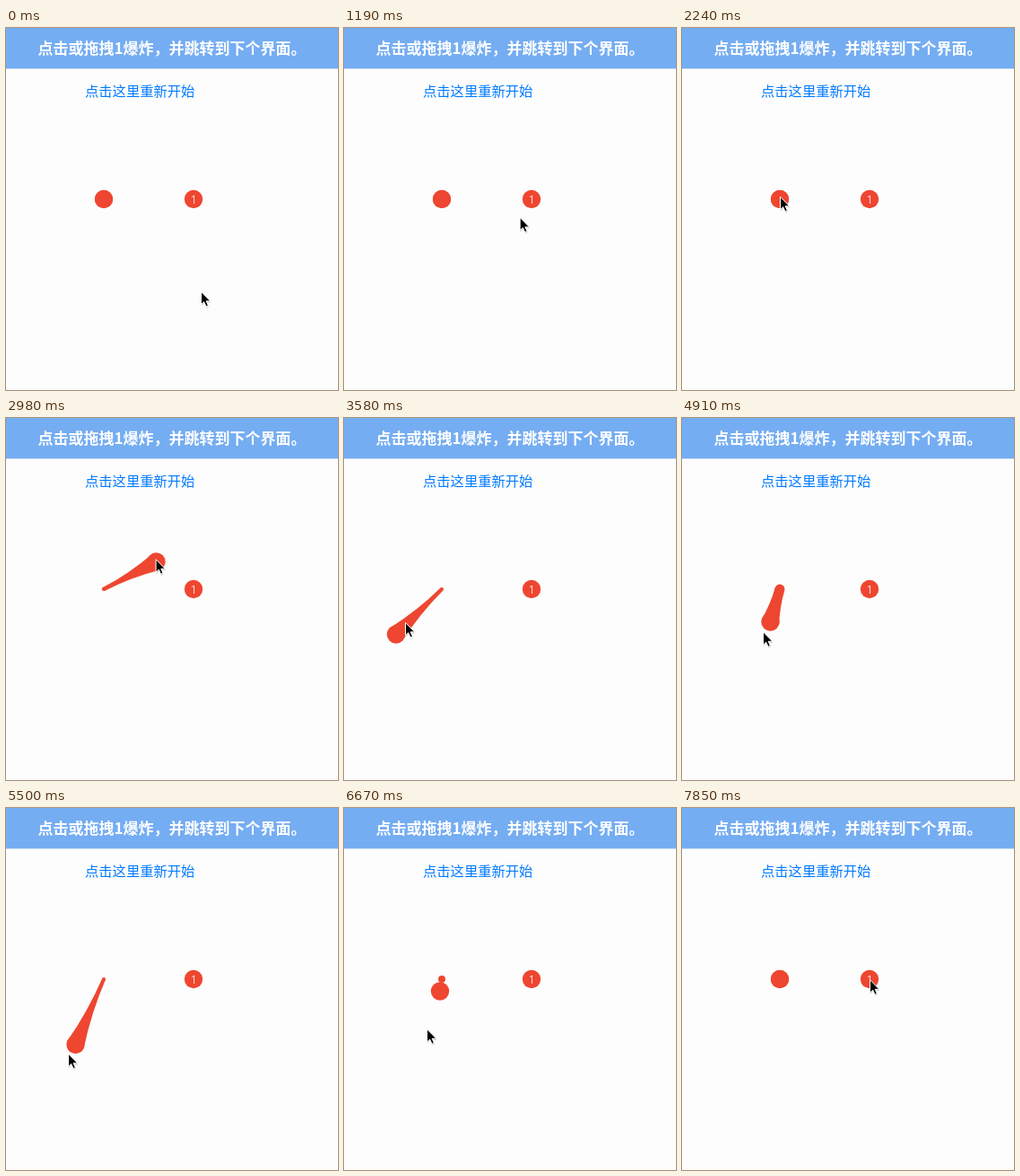
Recreate the animation shown at these times as an HTML page. Size 370 px wide and 404 px high, loop 8 s.

```html
<!DOCTYPE html>
<html lang="zh-CN">
<head>
<meta charset="utf-8">
<style>
  html, body { margin: 0; width: 100%; height: 100%; overflow: hidden; background: #fdfdfd; }
  svg { display: block; width: 370px; height: 404px; }
  text { font-family: "Noto Sans CJK SC", "Noto Sans CJK", "Noto Sans CJK JP", sans-serif; text-anchor: middle; }
  .title { font-size: 17px; font-weight: 700; fill: #fff; }
  .link { font-size: 15.3px; fill: #007aff; }
  .badge { font: 300 12px Inter, "Liberation Sans", sans-serif; fill: #fff; }
  .red { fill: #ee4630; }
</style>
</head>
<body>
<svg viewBox="0 0 370 404">
  <rect width="370" height="404" fill="#fdfdfd"/>
  <rect width="370" height="45.4" fill="#75adf2"/>
  <text class="title" x="185" y="29.3">点击或拖拽1爆炸，并跳转到下个界面。</text>
  <text class="link" x="149.2" y="75.7">点击这里重新开始</text>

  <circle class="red" cx="209" cy="191" r="10.2"/>
  <text class="badge" x="208.8" y="195.5">1</text>

  <path id="neck" class="red"/>
  <circle id="stub" class="red" cx="109" cy="191"/>
  <circle id="ball" class="red" r="10.2"/>

  <g id="cursor">
    <path d="M.6 1.8V16.2L4 13.2L6.4 18.2L9 17L6.8 12.4H11.6Z" fill="#000" opacity=".18"/>
    <path d="M.5 .3V14.6L3.7 11.7L6 16.8L8.4 15.8L6.2 10.8H10.8Z" fill="#000" stroke="#fff"/>
  </g>
</svg>
<script>
  const LOOP = 8000, STEP = 148, HOME = [109, 191], R = 10, REACH = 85;
  const $ = id => document.getElementById(id);

  // Key poses: x, y, step of arrival, step of departure (if it rests there)
  const pose = (x, y, from, to = from) => ({ x, y, from, to });
  const cursorPath = [
    pose(217, 294, 0, 2), pose(192, 197, 10), pose(109, 188, 15),
    pose(177, 150, 19), pose(68, 228, 24, 25), pose(100, 203, 28),
    pose(90, 238.5, 33), pose(69, 274, 37), pose(48, 288, 40, 41),
    pose(92, 246.5, 43, 45), pose(233, 200, 48), pose(211, 194, 49, 51),
    pose(209, 191.5, 53, 55)
  ];
  const ballPath = [
    pose(...HOME, 0, 15), pose(179, 152, 19), pose(58, 241.5, 24, 25),
    pose(...HOME, 27, 28), pose(98.5, 227.5, 33), pose(77.5, 264, 37),
    pose(57, 278, 40, 41), pose(107, 204.5, 43, 45), pose(...HOME, 46, 55)
  ];

  function at(path, n) {
    const i = path.findIndex(p => p.to >= n);
    const b = path[i];
    if (n >= b.from) return [b.x, b.y];
    const a = path[i - 1];
    const k = (1 - Math.cos(Math.PI * (n - a.to) / (b.from - a.to))) / 2;
    return [a.x + (b.x - a.x) * k, a.y + (b.y - a.y) * k];
  }

  // Sticky band between the shrinking anchor and the dragged ball
  function neckShape(x, y, r, dist) {
    const ux = (x - HOME[0]) / dist, uy = (y - HOME[1]) / dist;
    const point = (along, side) =>
      `${HOME[0] + ux * along - uy * side} ${HOME[1] + uy * along + ux * side}`;
    return `M${point(0, r)}Q${point(dist / 2, r)} ${point(dist, R)}` +
           `L${point(dist, -R)}Q${point(dist / 2, -r)} ${point(0, -r)}Z`;
  }

  function draw(time) {
    const n = Math.floor(time % LOOP / STEP);
    const [cx, cy] = at(cursorPath, n);
    const [x, y] = at(ballPath, n);
    const dist = Math.hypot(x - HOME[0], y - HOME[1]);
    const loose = n >= 42 && n <= 45;  // released after the band has torn
    const r = loose ? 4 : dist > REACH ? 0 : Math.max(2, R - dist / 8.4);

    $("cursor").setAttribute("transform", `translate(${cx} ${cy})`);
    $("ball").setAttribute("cx", x);
    $("ball").setAttribute("cy", y);
    $("stub").setAttribute("r", r);
    $("neck").setAttribute("d", loose || !r || dist < 1 ? "" : neckShape(x, y, r, dist));
  }

  const start = performance.now();
  function frame() {
    draw(performance.now() - start);
    requestAnimationFrame(frame);
  }
  frame();
</script>
</body>
</html>
```
